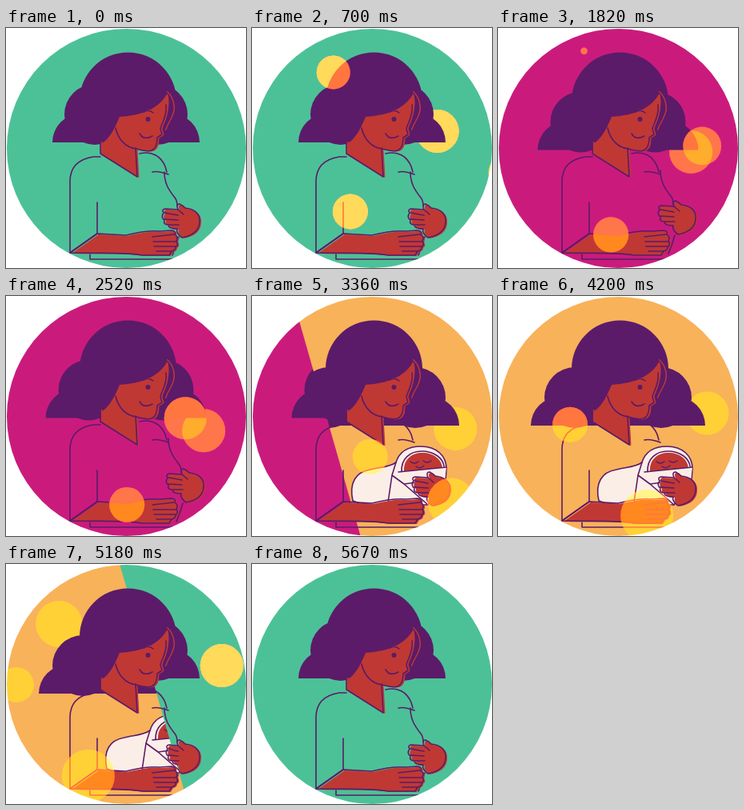
Write an HTML page with a canvas that moves like this. It is 300 px wide and 300 px high and loops after 5740 ms.

```html
<!DOCTYPE html>
<html lang="en">
<head>
<meta charset="utf-8">
<title>Mother and baby</title>
<style>
html, body { margin: 0; width: 100%; height: 100%; overflow: hidden; background: #fff; }
canvas { display: block; width: 300px; height: 300px; }
</style>
</head>
<body>
<canvas id="stage"></canvas>
<script>
const LOOP = 5740, STEP = 70, SIZE = 300;
const PURPLE = '#5b1b69', SKIN = '#c03834', WHITE = '#fbeee7';
const dpr = window.devicePixelRatio || 1;

function context(canvas) {
  canvas.width = canvas.height = SIZE * dpr;
  const c = canvas.getContext('2d');
  c.scale(dpr, dpr);
  c.lineJoin = c.lineCap = 'round';
  return c;
}
const stage = context(document.getElementById('stage'));
const layer = context(document.createElement('canvas'));
let g = stage;

const path = d => new Path2D(d);
function disc(x, y, r) {
  const p = new Path2D();
  p.arc(x, y, r, 0, 2 * Math.PI);
  return p;
}

// The hair is a dome over two pairs of lobes; spread pushes them out and down
function hairPath(spread) {
  const p = disc(152.5, 91, 60.5), y = 143 + 19 * spread;
  for (const side of [-1, 1]) {
    p.addPath(disc(150 + side * (39 + 15 * spread), y - 35, 38));
    const x = 150 + side * (56 + 17 * spread);
    p.moveTo(x - 36, y);
    p.arc(x, y, 36, Math.PI, 2 * Math.PI);
  }
  p.rect(94 - 17 * spread, y - 36, 112 + 34 * spread, 36);
  return p;
}

const scenes = {
  green: { bg: '#4cc197', hair: hairPath(0), dx: 0, dy: 0 },
  magenta: { bg: '#ca1b7d', hair: hairPath(0.5), dx: 5, dy: -4 },
  orange: { bg: '#f8b25a', hair: hairPath(1), dx: 5, dy: 0, baby: true }
};

const face = path('M200 80C203 92 202 104 194 121L193 126L195 133L189 137C190 144 188 152 181 153C174 154 168 151 162 150L164 186L118 157V143C128 137 134 124 140 110C170 108 190 99 200 80Z');
const faceLines = path('M200 80C207 86 211 98 207 108C204 116 200 120 198 127M118 143V157L164 186L162 150M137 125C140 139 150 150 163 151C170 153 177 155 182 153C188 151 189 144 189 137L195 133L193 126C194 120 202 110 200 96M172 105Q178 101 184 106M167 132Q172 141 183 135');
const eye = disc(177.5, 114, 3);
const dress = path('M118 161H109C90 164 80 174 80 192V281L114 257V218M105 283V289H214M167 157C183 153 194 161 199 173L201 180M183 180Q190 178 203 183');
const belly = path('M198 180C198 194 203 202 211 212Q214 216 214 222M216 261Q213 272 208 284');

const arm = path('M114 257L150 259C166 255 178 253 192 254L207 253Q213 254 211 258Q216 262 213 266Q216 271 212 274Q212 278 207 279L204 284H170C148 280 130 282 80 281Z');
const armLines = path('M183 261L210 258M184 267H213M185 273H212M188 279H207');
const hand = path('M197 231Q194 227 199 226L215 227Q212 220 217 220Q221 222 224 225C235 226 243 232 242 242C242 253 233 260 220 262Q212 256 214 251Q203 251 203 246Q196 246 198 240Q193 237 197 231Z');
const handLines = path('M198 231L215 234M198 239L215 240M204 246H216M215 227L222 233');

const cloth = path('M126 256C121 233 130 220 148 217C160 214 172 214 180 208C184 195 194 188 211 188C231 188 243 200 243 216L242 230L220 261H166C151 260 139 262 126 256Z');
const head = path('M189 218C188 203 199 195 212 195C226 195 236 203 237 214Z');
const fold = path('M183 220L243 214L241 229L213 232L190 235L175 224Z');
const clothLines = path('M187 220C186 203 198 194 212 194C228 194 239 203 240 213M183 220L243 214M180 208L175 224L190 235L213 232M175 224L170 258M190 235L220 261');
const babyFace = path('M198 207Q203 211 208 207M214 206Q219 210 224 206M205 213Q210 217 215 212');

function stroke(p, color = PURPLE, width = 1.6) {
  g.strokeStyle = color;
  g.lineWidth = width;
  g.stroke(p);
}
function fill(p, color) {
  g.fillStyle = color;
  g.fill(p);
}
function shifted(x, y, draw) {
  g.save();
  g.translate(x, y);
  draw();
  g.restore();
}
// Skin sits slightly off its outline, like a loose print
function printed(p, lines) {
  shifted(2, 1, () => fill(p, SKIN));
  if (lines) {
    stroke(p);
    stroke(lines);
  }
}

// Drifting bubbles pass one point per beat, from beat "first" on
const BEAT = 962;
const wander = (first, ...points) => t => {
  const u = Math.max(0, Math.min(points.length - 1.001, (t - 368) / BEAT - first));
  const i = Math.floor(u), [a, b] = [points[i], points[i + 1]];
  return a.map((v, n) => v + (b[n] - v) * (u - i));
};
const sway = t => [237 + (t - 1330) * 0.0085, 148 + 22 * Math.cos((t - 2850) / 823)];

const bubbles = [
  { at: wander(0, [100, 62], [105, 43], [110, 15]), r: 21, end: 1900, front: true },
  { at: wander(0, [118, 225], [132, 238], [150, 278], [155, 206], [89, 160], [13, 151], [-62, 142]), r: 22, front: true },
  { at: wander(0, [328, 184], [298, 175], [214, 121], [257, 255], [185, 275], [103, 265], [21, 255]), r: 22, grow: 11, front: true },
  { at: sway, r: 27 },
  { at: wander(4, [-34, 104], [66, 75], [166, 46]), r: 29, start: 3800 }
];

// Full red plus a veil of yellow, so every colour below warms up
function drawBubbles(front, t) {
  for (const b of bubbles.filter(b => !!b.front === front)) {
    const age = t - (b.start || 70), left = (b.end || 5600) - t;
    const scale = Math.min(1, age / 400, left / 400);
    if (scale <= 0) continue;
    const growth = (b.grow || 0) * Math.max(0, Math.min(1, (t - 1330) / 2870));
    const p = disc(...b.at(t), (b.r + growth) * scale);
    fill(p, 'rgba(255, 255, 0, 0.4)');
    g.globalCompositeOperation = 'lighter';
    fill(p, '#f00');
    g.globalCompositeOperation = 'source-over';
  }
}

function drawScene(s, t) {
  g.fillStyle = s.bg;
  g.fillRect(0, 0, SIZE, SIZE);
  drawBubbles(false, t);
  fill(s.hair, PURPLE);
  printed(face);
  shifted(1.5, 0, () => stroke(faceLines, SKIN, 1.8));
  stroke(faceLines);
  fill(eye, PURPLE);
  stroke(dress);
  if (s.baby) {
    fill(cloth, WHITE);
    stroke(cloth);
    shifted(1, 1, () => fill(head, SKIN));
    fill(fold, WHITE);
    stroke(clothLines);
    stroke(babyFace, PURPLE, 1.4);
  } else {
    shifted(s.dx, s.dy / 2, () => stroke(belly));
  }
  shifted(s.dx, s.dy, () => printed(hand, handLines));
  printed(arm, armLines);
}

// Slanted wipes sweep in from the right: [start, scene]
const wipes = [[1260, scenes.magenta], [3106, scenes.orange], [5025, scenes.green]];
const SPEED = 65 / STEP, SLOPE = 0.285;

function render(t) {
  let base = scenes.green, next = null, x = 0;
  for (const [start, scene] of wipes) {
    if (t < start) break;
    x = 286 - (t - start) * SPEED;
    if (x < -90) base = scene;
    else next = scene;
  }
  g = stage;
  drawScene(base, t);
  if (next) {
    g = layer;
    drawScene(next, t);
    g = stage;
    g.save();
    g.clip(path(`M${x} 0H400V300H${x + SIZE * SLOPE}Z`));
    g.drawImage(layer.canvas, 0, 0, SIZE, SIZE);
    g.restore();
  }
  drawBubbles(true, t);
  g.globalCompositeOperation = 'destination-in';
  fill(disc(150.5, 150.5, 149.5), '#000');
  g.globalCompositeOperation = 'source-over';
}

const began = performance.now();
function tick() {
  const t = (performance.now() - began) % LOOP;
  render(Math.floor(t / STEP) * STEP);
  requestAnimationFrame(tick);
}
tick();
</script>
</body>
</html>
```
